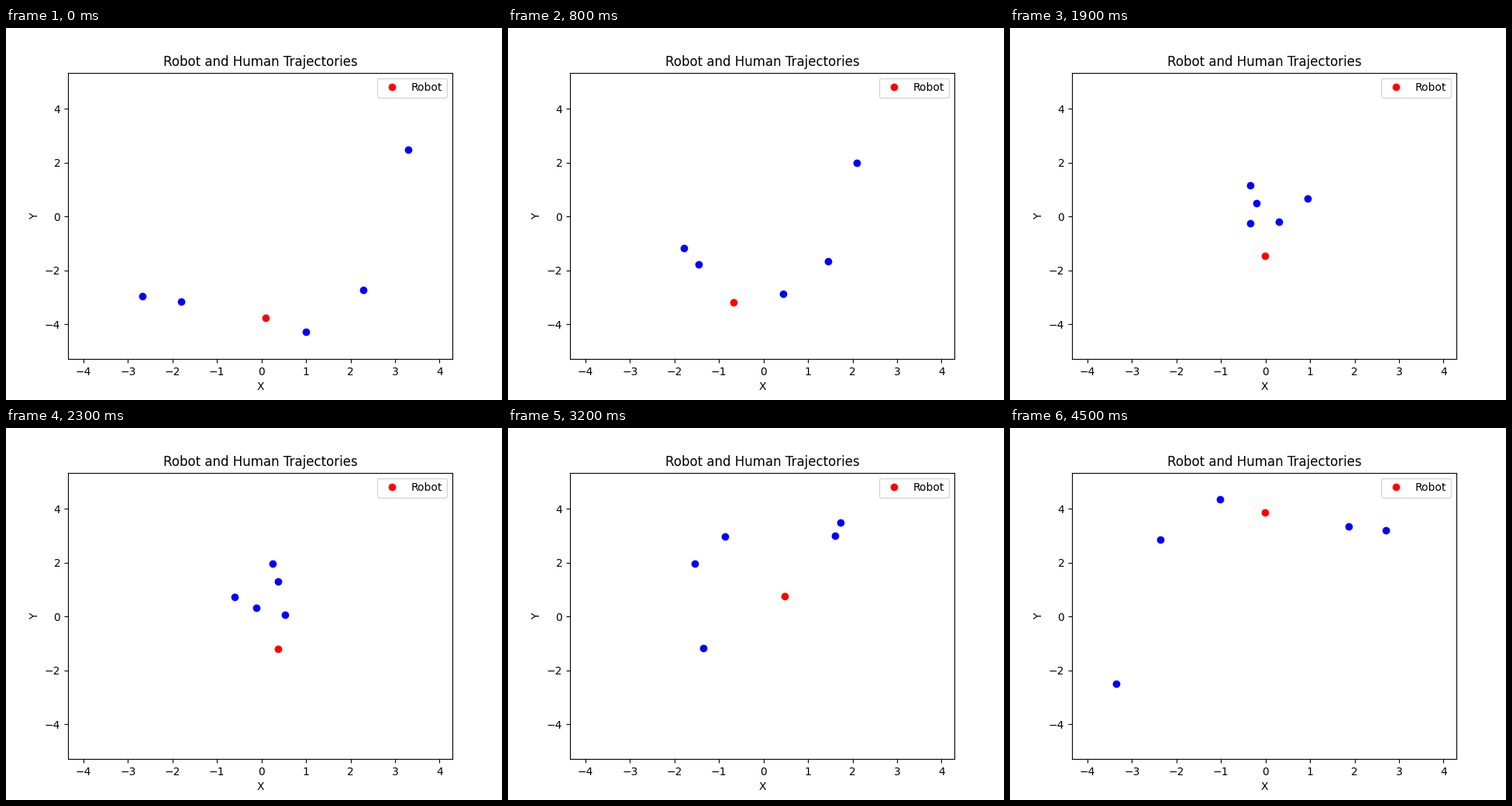
Write a matplotlib script that moves like this. It is 640x480 px and loops after 4600 ms.

```python
import numpy as np
import matplotlib.pyplot as plt
from matplotlib.animation import FuncAnimation

FRAMES, INTERVAL = 46, 100
STEP = 0.25                               # time step, also the top step length
ORIGIN = np.array([329.63, 243.32])       # data origin on screen
SCALE = np.array([57.445, -34.725])       # screen pixels per data unit


def to_data(points):
    return (np.asarray(points, float) - ORIGIN) / SCALE


def walk(*keys, goal=None):
    """Pass (frame, x, y) points at even speed, then ease in to the goal."""
    keys = np.array(keys, float)
    pos = to_data(keys[:, 1:])
    frames = np.arange(FRAMES)
    path = np.column_stack([np.interp(frames, keys[:, 0], p) for p in pos.T])
    if goal is not None:
        end = to_data(goal)
        for i in range(int(keys[-1, 0]) + 1, FRAMES):
            gap = end - path[i - 1]
            path[i] = path[i - 1] + STEP * gap / max(1, np.hypot(*gap))
    return path


robot_path = walk((0, 335, 374), (8, 291, 354), (12, 296, 345), (18, 324, 296),
                  (24, 356, 283), (27, 366, 259), (37, 349, 174), (45, 329, 109))

human_paths = np.stack([
    walk((0, 176, 346), (8, 227, 284), (15, 276, 231), (30, 403, 126),
         (35, 467.5, 115), goal=(486.2, 133)),
    walk((0, 226, 353), (8, 246, 305), (15, 284, 254), goal=(437.3, 126.3)),
    walk((0, 387, 392), (8, 355, 343), (15, 326, 285), (23, 295, 218),
         goal=(270.6, 91)),
    walk((0, 461, 338), (24, 317, 227), goal=(193, 143)),
    walk((0, 519, 157), (8, 450, 174), (12, 425, 183), (23, 360, 241),
         goal=(130, 333)),
])

fig, ax = plt.subplots(figsize=(6.4, 4.8), dpi=100)
(left, bottom), (right, top) = to_data([(80, 427.2), (576, 57.6)])
ax.set(xlim=(left, right), ylim=(bottom, top), xlabel="X", ylabel="Y",
       title="Robot and Human Trajectories")

robot, = ax.plot([], [], "ro", label="Robot")
humans, = ax.plot([], [], "bo")
ax.legend(loc="upper right")


def update(i):
    robot.set_data(robot_path[i:i + 1].T)
    humans.set_data(human_paths[:, i].T)
    return robot, humans


anim = FuncAnimation(fig, update, frames=FRAMES, interval=INTERVAL,
                     repeat=True, repeat_delay=0)
plt.show()
```
